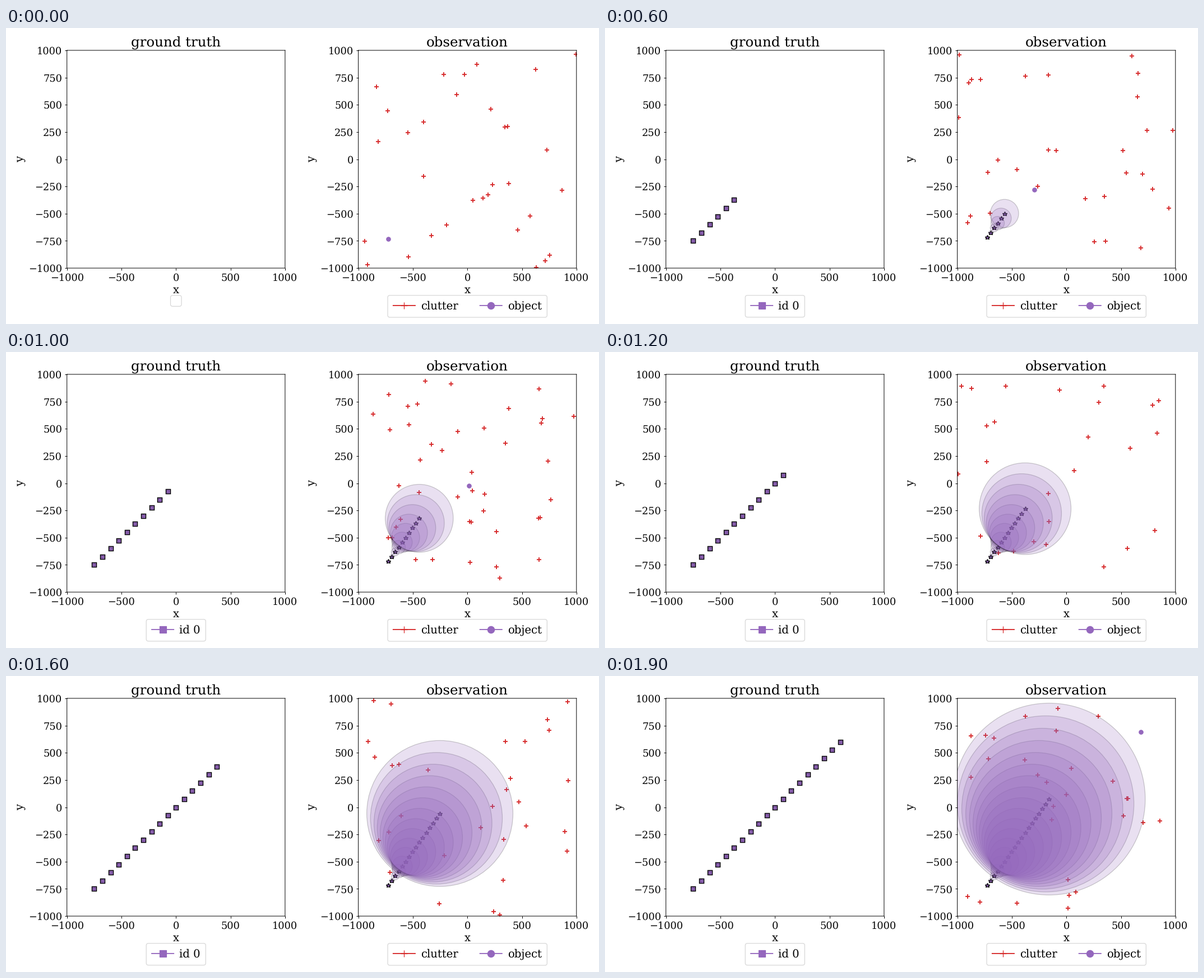
Animation, 1058 px wide and 529 px high, one loop 2 s. Source, as a matplotlib script:

```python
import numpy as np
import matplotlib.pyplot as plt
from matplotlib.animation import FuncAnimation
from matplotlib.lines import Line2D
from matplotlib.patches import Circle

W, H = 1058, 529
STEPS, INTERVAL = 20, 100
PURPLE, RED = "#9467bd", "#d62728"
LIMIT = 1000
CLUTTER_RATE = 30       # mean number of false alarms per scan
SENSOR_NOISE = 15
DROPOUT = range(12, 17)  # steps without a detection

plt.rcParams.update({
    "font.family": "DejaVu Serif",
    "axes.titlesize": 20,
    "axes.labelsize": 16,
    "legend.fontsize": 16,
    "xtick.labelsize": 14.5,
    "ytick.labelsize": 14.5,
    "path.snap": False,
    "text.hinting": "none",
})

steps = np.arange(STEPS)
truth = np.column_stack([-750 + 75 * steps] * 2)
track = np.column_stack([-725 + 31.5 * steps, -719 + 44.1 * steps])
# A prediction without updates grows more uncertain with every step.
spread = np.sqrt(225 + 133 * steps**3)


def make_axes(left, title):
    ax = fig.add_axes([left / W, 1 - 429.1 / H, 389.2 / W, 389.2 / H])
    ax.set(xlim=(-LIMIT, LIMIT), ylim=(-LIMIT, LIMIT), title=title,
           xticks=range(-LIMIT, LIMIT + 1, 500),
           yticks=range(-LIMIT, LIMIT + 1, 250))
    ax.set_xlabel("x", labelpad=2.8)
    ax.set_ylabel("y")
    return ax


def key(color, marker, label):
    return Line2D([], [], color=color, marker=marker, markersize=10, label=label)


def add_legend(ax, handles):
    return ax.legend(handles=handles, loc="upper center", ncol=2,
                     bbox_to_anchor=(0.5, -0.1), borderpad=0.5,
                     handletextpad=0.5)


def add_circles(ax, centers, radii):
    circles = [Circle(c, r, facecolor=PURPLE, edgecolor="black", lw=1,
                      alpha=0.2, zorder=3) for c, r in zip(centers, radii)]
    for circle in circles:
        ax.add_patch(circle)
    return circles


def add_markers(ax, marker, size=6, color=PURPLE, **style):
    return ax.plot([], [], marker, color=color, markersize=size, **style)[0]


def scan(k):
    """Clutter points and the detected object, if any, at step k."""
    rng = np.random.default_rng(k)
    clutter = rng.uniform(-LIMIT, LIMIT, (rng.poisson(CLUTTER_RATE), 2))
    detection = truth[k:k + 1] + rng.normal(0, SENSOR_NOISE, 2)
    return clutter, detection[:0] if k in DROPOUT else detection


fig = plt.figure(figsize=(12, 6), dpi=W / 12, facecolor="white")
ax_truth = make_axes(108.7, "ground truth")
ax_obs = make_axes(628.6, "observation")

empty_legend = add_legend(ax_truth, [])
ax_truth.add_artist(empty_legend)
id_legend = add_legend(ax_truth, [key(PURPLE, "s", "id 0")])
add_legend(ax_obs, [key(RED, "+", "clutter"), key(PURPLE, "o", "object")])

outlined = dict(size=7, markeredgecolor="black", markeredgewidth=1.2)
squares = add_markers(ax_truth, "s", **outlined)
stars = add_markers(ax_obs, "*", **outlined)
clutter_marks = add_markers(ax_obs, "+", color=RED, markeredgewidth=1.5)
object_mark = add_markers(ax_obs, "o")
truth_circles = add_circles(ax_truth, truth, np.full(STEPS, 10))
track_circles = add_circles(ax_obs, track, spread)


def draw(k):
    clutter, detection = scan(k)
    clutter_marks.set_data(*clutter.T)
    object_mark.set_data(*detection.T)
    squares.set_data(*truth[:k].T)
    stars.set_data(*track[:k].T)
    for circles in (truth_circles, track_circles):
        for i, circle in enumerate(circles):
            circle.set_visible(i < k)
    empty_legend.set_visible(k == 0)
    id_legend.set_visible(k > 0)
    return []


anim = FuncAnimation(fig, draw, frames=STEPS, interval=INTERVAL,
                     init_func=lambda: draw(0), repeat=True, repeat_delay=0)
plt.show()
```
